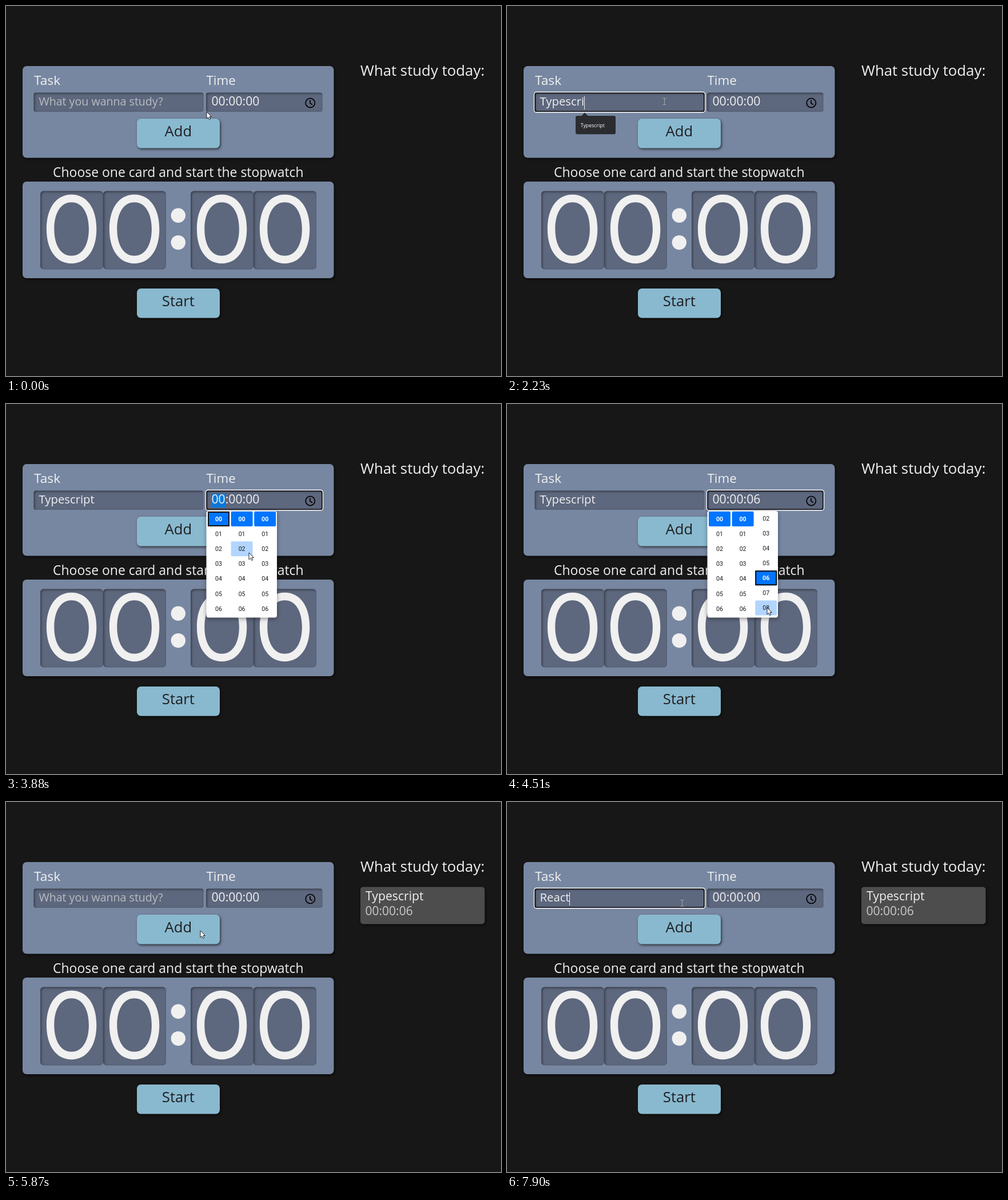
These frames come from a looping animation (866 px wide and 647 px high, 8 s). An HTML page with a canvas:

```html
<!DOCTYPE html>
<html lang="en">
<head>
<meta charset="utf-8">
<title>Study timer</title>
<style>
html, body { margin: 0; width: 100%; height: 100%; overflow: hidden; background: #171717; }
canvas { display: block; }
</style>
</head>
<body>
<canvas id="stage" width="866" height="647"></canvas>
<script>
const ctx = document.getElementById('stage').getContext('2d');
const LOOP = 8000;
const UI = '"Open Sans", "Noto Sans", sans-serif';
const SMALL = 'Roboto, "Liberation Sans", sans-serif';
const WHITE = '#f0f0f0', PANEL = '#7787a1', FIELD = '#5d677d', BUTTON = '#89b9cf';

// Moments of the session, in ms
const FOCUS_TASK = 180, FOCUS_TIME = 3250, OPEN_PICKER = 3430, PICK = 4460;
const CLOSE_PICKER = 5170, ADD = 5730, REFOCUS = 6570;
const TYPING = [
  { word: 'Typescript', at: [1100, 1320, 1480, 1580, 1840, 1960, 2060, 2160, 2290, 2380] },
  { word: 'React', at: [6990, 7180, 7300, 7410, 7630] }
];
const SUGGEST = ['Typescript', 'React', 'Tailwind', 'Javascript', 'Node', 'Python'];
const CLICKS = [FOCUS_TASK, CLOSE_PICKER, ADD, REFOCUS];
const PATH = [
  [0, 351, 185], [30, 351, 185], [175, 275, 167], [2730, 275, 167], [3200, 531, 165],
  [3550, 531, 165], [3880, 425, 260], [4340, 450, 262], [4440, 455, 356],
  [4890, 455, 356], [5150, 538, 240], [5260, 538, 240], [5690, 340, 225],
  [6220, 340, 225], [6500, 268, 163], [7630, 268, 163], [7880, 306, 177]
];

const within = (t, a, b) => t >= a && t < b;
const ease = p => p * p * (3 - 2 * p);

function pointer(t) {
  const i = PATH.findIndex(k => k[0] > t);
  if (i < 0) return PATH[PATH.length - 1].slice(1);
  const [t0, x0, y0] = PATH[i - 1], [t1, x1, y1] = PATH[i];
  const p = ease((t - t0) / (t1 - t0));
  return [x0 + (x1 - x0) * p, y0 + (y1 - y0) * p];
}

function text(str, x, y, size, color = WHITE, align = 'left', font = UI, weight = 400) {
  ctx.font = `${weight} ${size}px ${font}`;
  ctx.fillStyle = color;
  ctx.textAlign = align;
  ctx.fillText(str, x, y);
}

function box(x, y, w, h, r, color) {
  ctx.beginPath();
  ctx.roundRect(x, y, w, h, r);
  ctx.fillStyle = color;
  ctx.fill();
}

function shadow(color, blur, dx, dy) {
  ctx.shadowColor = color;
  ctx.shadowBlur = blur;
  ctx.shadowOffsetX = dx;
  ctx.shadowOffsetY = dy;
}

function raised(x, y, w, h, r, color) {
  ctx.save();
  shadow('rgba(0,0,0,.65)', 4, 1.5, 2);
  box(x, y, w, h, r, color);
  ctx.restore();
}

function sunken(x, y, w, h, r) {
  box(x, y, w, h, r, FIELD);
  ctx.save();
  ctx.clip();
  shadow('rgba(0,0,0,.55)', 4, 1.5, 1.5);
  ctx.beginPath();
  ctx.rect(x - 20, y - 20, w + 40, h + 40);
  ctx.roundRect(x - .5, y - .5, w + 1, h + 1, r);
  ctx.fillStyle = '#000';
  ctx.fill('evenodd');
  ctx.restore();
}

function disc(x, y, r, color) {
  ctx.beginPath();
  ctx.arc(x, y, r, 0, 7);
  ctx.fillStyle = color;
  ctx.fill();
}

function oval(x, y, a, b, k) {
  ctx.moveTo(x + a, y);
  for (const [u, v] of [[1, 1], [-1, 1], [-1, -1], [1, -1]]) {
    if (u * v > 0) ctx.bezierCurveTo(x + u * a, y + v * b * k, x + u * a * k, y + v * b, x, y + v * b);
    else ctx.bezierCurveTo(x + u * a * k, y + v * b, x + u * a, y + v * b * k, x + u * a, y);
  }
}

function bigZero(x) {
  ctx.beginPath();
  oval(x, 390, 43.7, 60.2, .61);
  oval(x, 390, 30.3, 46.8, .61);
  ctx.fillStyle = WHITE;
  ctx.fill('evenodd');
}

function focusRing(x, y, w, h) {
  ctx.lineWidth = 2;
  ctx.strokeStyle = '#101014';
  ctx.beginPath();
  ctx.roundRect(x + 1, y + 1, w - 2, h - 2, 3);
  ctx.stroke();
  ctx.lineWidth = 1.3;
  ctx.strokeStyle = '#fff';
  ctx.beginPath();
  ctx.roundRect(x - .5, y - .5, w + 1, h + 1, 4);
  ctx.stroke();
}

function caret(x) {
  ctx.fillStyle = WHITE;
  ctx.fillRect(Math.round(x), 158, 1, 23);
}

function clockIcon() {
  ctx.strokeStyle = '#050505';
  ctx.lineWidth = 1.8;
  ctx.beginPath();
  ctx.arc(532.3, 169.5, 8.1, 0, 7);
  ctx.moveTo(532, 164.5);
  ctx.lineTo(532, 170);
  ctx.lineTo(536, 172.5);
  ctx.stroke();
}

function layout() {
  ctx.fillStyle = '#171717';
  ctx.fillRect(0, 0, 866, 647);
  raised(29, 105, 544.5, 160.5, 7, PANEL);
  raised(29, 307, 544.5, 169, 7, PANEL);
  text('Task', 49, 138, 22.7);
  text('Time', 350.5, 138, 22.3);
  sunken(48.5, 151.5, 297, 33.5, 4);
  sunken(350, 151.5, 203.5, 33.5, 4);
  for (const [y, label] of [[197, 'Add'], [494, 'Start']]) {
    raised(229, y, 145, 51.5, 7, BUTTON);
    text(label, 301.3, y + 31, 25.7, '#1f1f22', 'center');
  }
  text('Choose one card and start the stopwatch', 301.3, 299, 22.95, WHITE, 'center');
  for (const x of [60, 170, 323, 433]) {
    sunken(x, 323.5, 110, 137, 6);
    bigZero(x + 54.6);
  }
  disc(301.3, 366.3, 12.7, WHITE);
  disc(301.3, 413.6, 12.7, WHITE);
  text('What study today:', 620, 122, 25.8);
}

function taskField(t) {
  const { word, at } = TYPING[t < ADD ? 0 : 1];
  const count = at.filter(k => k <= t).length;
  const value = word.slice(0, count);
  if (value) text(value, 57.5, 174, 20.3);
  else text('What you wanna study?', 57.5, 174, 19.6, '#b9bcc2');
  if (!within(t, FOCUS_TASK, FOCUS_TIME) && t < REFOCUS) return;

  focusRing(48, 151, 298, 34.5);
  const last = count ? at[count - 1] : t < ADD ? FOCUS_TASK : REFOCUS;
  ctx.font = `400 20.3px ${UI}`;
  if ((t - last) % 1000 < 500) caret(57 + ctx.measureText(value).width);
  if (within(t, 240, 2420) || within(t, 6600, 7710)) {
    const key = at.find(k => k + 30 > t);
    const seen = word.slice(0, key === undefined ? count : Math.min(count, at.indexOf(key)));
    suggestions(SUGGEST.filter(s => s.startsWith(seen)));
  }
}

function suggestions(items) {
  const step = 26.6;
  box(120, 192, 70, 32.3 + step * (items.length - 1), 3, '#2b2c30');
  ctx.beginPath();
  ctx.moveTo(130, 192.5);
  ctx.lineTo(136, 186.5);
  ctx.lineTo(142, 192.5);
  ctx.fill();
  items.forEach((s, i) => text(s, 128.7, 212 + i * step, 8.8, '#fff'));
}

function timeField(t) {
  if (within(t, FOCUS_TIME, CLOSE_PICKER)) focusRing(350, 151, 204, 34.5);
  if (within(t, FOCUS_TIME, PICK)) {
    ctx.fillStyle = '#0b78d7';
    ctx.fillRect(359, 157, 25, 24);
    if (t < OPEN_PICKER) caret(359);
  }
  text(within(t, PICK, ADD) ? '00:00:06' : '00:00:00', 359.5, 174, 21.2);
  clockIcon();
  if (within(t, CLOSE_PICKER, 5690)) caret(522);
}

function picker(t, [px, py]) {
  if (!within(t, OPEN_PICKER, CLOSE_PICKER)) return;
  const step = 26.1;
  ctx.save();
  shadow('rgba(0,0,0,.4)', 7, 0, 2);
  box(350.5, 187, 123.5, 186.5, 4, '#fff');
  ctx.restore();
  ctx.save();
  ctx.beginPath();
  ctx.rect(351, 187.5, 122, 184);
  ctx.clip();
  for (let col = 0; col < 3; col++) {
    const x = 353 + col * 40.6;
    const chosen = col === 2 && t >= PICK ? 6 : 0;
    const scroll = chosen * ease(Math.min(1, Math.max(0, (t - PICK) / 130)));
    for (let n = 0; n < 14; n++) {
      const y = 188 + (n - scroll) * step;
      if (y < 160 || y > 371) continue;
      const on = n === chosen;
      const hover = px >= x && px < x + 38 && py >= y && py < y + step;
      if (on || hover) box(x, y, 38, 26, 2, on ? '#0075ff' : '#b2d5ff');
      if (on && col === (t < PICK ? 0 : 2)) {
        ctx.strokeStyle = '#101010';
        ctx.lineWidth = 2;
        ctx.strokeRect(x + 1, y + 1, 36, 24);
      }
      text(String(n).padStart(2, '0'), x + 19, y + 17, 10.6, on ? '#fff' : '#1b1b1b', 'center', SMALL, on ? 700 : 400);
    }
  }
  ctx.restore();
}

function card(t) {
  if (t < ADD) return;
  raised(620, 148.5, 217.5, 65, 5, '#4d4d4d');
  text('Typescript', 629, 171.5, 21.2);
  text('00:00:06', 628.5, 198, 21, '#c9c9c9');
}

function ibeam(x, y) {
  ctx.strokeStyle = '#a3a5a8';
  ctx.lineWidth = 1;
  ctx.beginPath();
  ctx.moveTo(x - 2.5, y - 5.5);
  ctx.lineTo(x + 3.5, y - 5.5);
  ctx.moveTo(x + .5, y - 5.5);
  ctx.lineTo(x + .5, y + 5.5);
  ctx.moveTo(x - 2.5, y + 5.5);
  ctx.lineTo(x + 3.5, y + 5.5);
  ctx.stroke();
}

function arrow(x, y) {
  ctx.beginPath();
  [[0, 0], [0, 12], [2.7, 9.4], [4.6, 13.6], [6.7, 12.7], [4.9, 8.6], [8.5, 8.6]]
    .forEach(([dx, dy]) => ctx.lineTo(x + dx, y + dy));
  ctx.closePath();
  ctx.fillStyle = '#fff';
  ctx.fill();
  ctx.strokeStyle = '#111';
  ctx.lineWidth = .9;
  ctx.stroke();
}

function mouse(t, [x, y]) {
  if (CLICKS.some(c => within(t, c, c + 120))) disc(x, y, 9, '#b8bd55');
  const inTask = x > 48 && x < 346 && y > 151 && y < 185;
  (inTask ? ibeam : arrow)(x, y);
}

function draw(t) {
  const pos = pointer(t);
  layout();
  card(t);
  timeField(t);
  taskField(t);
  picker(t, pos);
  mouse(t, pos);
}

const start = performance.now();
function frame() {
  draw((performance.now() - start) % LOOP);
  requestAnimationFrame(frame);
}
frame();
</script>
</body>
</html>
```
